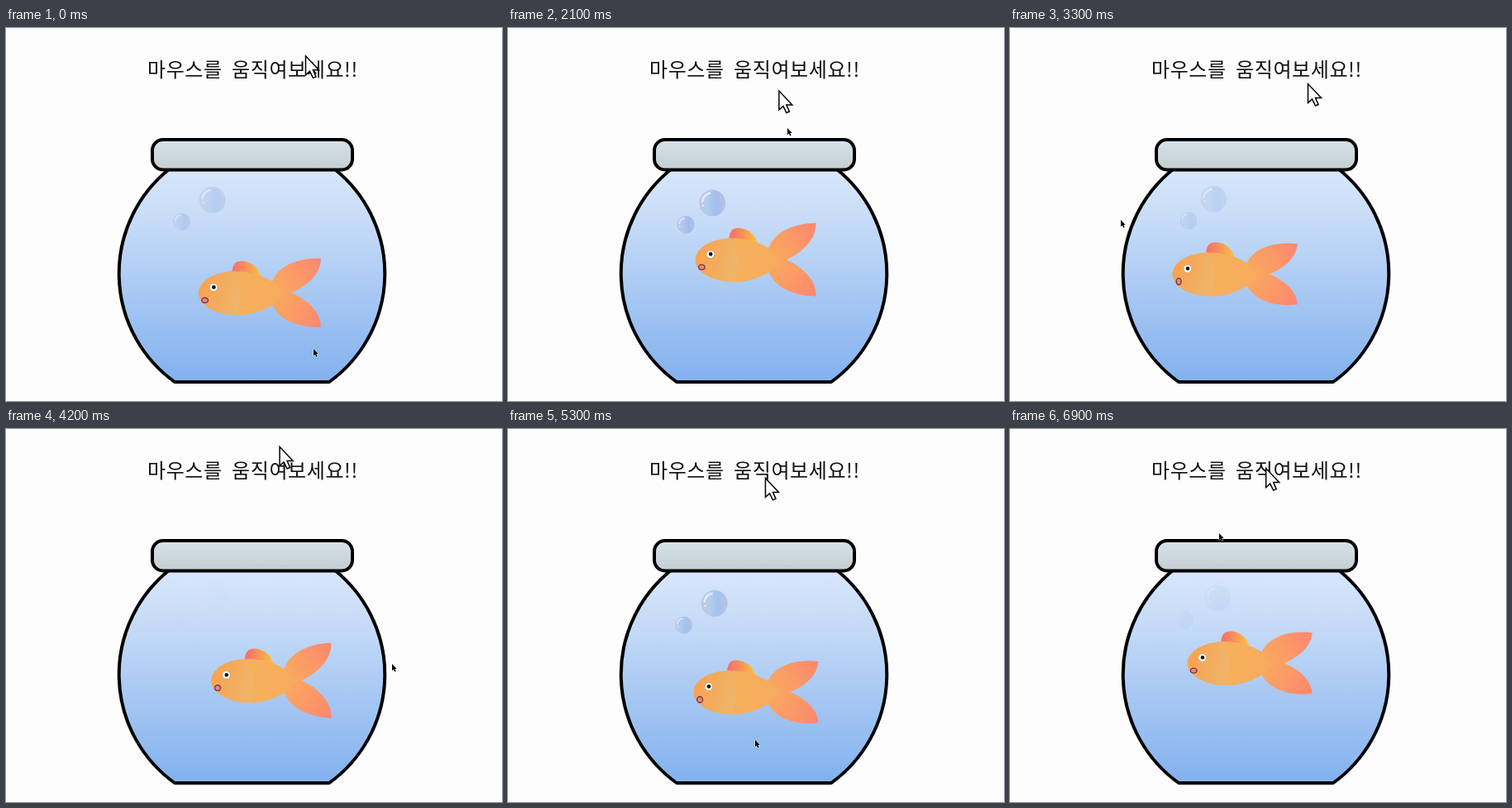
Recreate the animation shown at these times as an HTML page. Size 600 by 451 pixels, loop 7 s.

```html
<!DOCTYPE html>
<html lang="ko">
<head>
<meta charset="utf-8">
<title>Fishbowl</title>
<style>
  html, body { margin: 0; width: 100%; height: 100%; overflow: hidden; background: #fdfdfd; }
  svg { display: block; width: 100vw; height: 100vh; }
  text { font: 500 24px "Noto Sans CJK KR", "Noto Sans CJK", sans-serif; letter-spacing: .6px; word-spacing: 4px; fill: #111; }
</style>
</head>
<body>
<svg viewBox="0 0 600 451" preserveAspectRatio="none">
  <defs>
    <linearGradient id="water" x2="0" y2="1">
      <stop stop-color="#d8e6fb"/><stop offset=".25" stop-color="#c6dbf7"/><stop offset="1" stop-color="#82b1ee"/>
    </linearGradient>
    <linearGradient id="glass" x2="0" y2="1">
      <stop stop-color="#d6e2ea"/><stop offset="1" stop-color="#c4ced1"/>
    </linearGradient>
    <linearGradient id="skin">
      <stop stop-color="#f8a653"/><stop offset=".5" stop-color="#f6b05c"/><stop offset="1" stop-color="#f7ab5e"/>
    </linearGradient>
    <linearGradient id="face" x2="1" y2=".25">
      <stop stop-color="#fba04e"/><stop offset="1" stop-color="#efb468"/>
    </linearGradient>
    <linearGradient id="crest">
      <stop stop-color="#f46f70"/><stop offset=".4" stop-color="#f88c5c"/><stop offset="1" stop-color="#fcc43c"/>
    </linearGradient>
    <linearGradient id="tail">
      <stop stop-color="#f8ab5c"/><stop offset=".45" stop-color="#fb9c66"/><stop offset="1" stop-color="#fc8670"/>
    </linearGradient>
    <linearGradient id="shine">
      <stop stop-color="#c2bad4"/><stop offset=".3" stop-color="#a9c4e8"/>
      <stop offset=".65" stop-color="#8fb3e8"/><stop offset="1" stop-color="#b0b6da"/>
    </linearGradient>
    <g id="bubble">
      <circle r="16" fill="url(#shine)"/>
      <path d="M-12 -2Q-11 -10 -3 -12" fill="none" stroke="#eef5fd" stroke-width="2.4" stroke-linecap="round"/>
      <circle cx="-11" cy="3" r="1.4" fill="#e6effb"/>
    </g>
    <path id="fin" d="M-3 -3C8 -22 38 -25 70 0C58 16 34 19 0 8Z" fill="url(#tail)"/>
  </defs>

  <rect width="600" height="451" fill="#fdfdfd"/>
  <text x="171" y="58.5">마우스를 움직여보세요!!</text>

  <g stroke="#000" stroke-width="4" stroke-linejoin="round">
    <path d="M197 171A161.5 161.5 0 0 0 204 428H391A161.5 161.5 0 0 0 398 171Z" fill="url(#water)"/>
    <rect x="177" y="135" width="242" height="36.5" rx="13" fill="url(#glass)"/>
  </g>

  <g id="bubbles">
    <use id="big" href="#bubble"/>
    <use id="small" href="#bubble"/>
  </g>

  <g id="fish">
    <use id="finUp" href="#fin"/>
    <use id="finDown" href="#fin"/>
    <path d="M33 -33C33 -44 38 -48 45 -47.5C56 -47 66 -39 68 -27Z" fill="url(#crest)"/>
    <path d="M-7.5 -9C-7.5 -24 14 -35 36 -35C58 -35 74 -28 86 -20L95 -8L86 3C74 11 58 18 40 18C14 18 -7.5 6 -7.5 -9Z" fill="url(#skin)"/>
    <path d="M-7.5 -9C-7.5 -24 14 -35 36 -35Q50 -9 38 18C14 18 -7.5 6 -7.5 -9Z" fill="url(#face)"/>
    <circle cx="10.5" cy="-15.5" r="4.8" fill="#fff" stroke="#b98a5a" stroke-width=".5"/>
    <circle cx="10.8" cy="-15.8" r="2.3" fill="#111"/>
    <ellipse id="mouth" fill="#df8a80" stroke="#7a3340" stroke-width="1.4"/>
  </g>

  <path id="arrow" d="M0 0V23L5 18.5L9 26.5L12.5 25L9 17H16Z" fill="#fff" stroke="#000" stroke-width="1.5"/>
  <path id="pointer" d="M0 0V8.2L1.8 6.6L3.2 9.6L4.6 9L3.3 6H5.6Z" fill="#000" stroke="#fff" stroke-width=".8" paint-order="stroke"/>
</svg>
<script>
const $ = id => document.getElementById(id);
const LOOP = 7000, STEP = 100, TAU = 2 * Math.PI;

// pointer route: seconds, x, y
const route = [
  [0, 372, 388], [.3, 364, 393], [.6, 300, 365], [.8, 222, 392], [1, 140, 426],
  [1.15, 82, 396], [1.3, 115, 341], [1.6, 104, 240], [1.8, 200, 160], [2.1, 338, 121],
  [2.4, 420, 210], [2.7, 320, 320], [3, 180, 310], [3.2, 122, 258], [3.3, 134, 232],
  [3.6, 240, 150], [3.85, 390, 190], [4.05, 473, 250], [4.2, 467, 284], [4.5, 250, 330],
  [4.7, 40, 290], [4.8, 60, 260], [5.1, 495, 300], [5.3, 299, 376], [5.6, 150, 300],
  [5.9, 555, 120], [6.1, 440, 15], [6.4, 146, 190], [6.5, 156, 260], [6.65, 200, 328],
  [6.9, 253, 126], [7, 262, 100]
];

function slope(i, k) {
  const a = route[Math.max(i - 1, 0)], b = route[i], c = route[Math.min(i + 1, route.length - 1)];
  if ((b[k] - a[k]) * (c[k] - b[k]) <= 0) return 0;
  return (c[k] - a[k]) / (c[0] - a[0]);
}

function pointerAt(t) {
  t = Math.max(t, 0);
  let i = 0;
  while (i < route.length - 2 && route[i + 1][0] <= t) i++;
  const a = route[i], b = route[i + 1], h = b[0] - a[0], u = (t - a[0]) / h, v = 1 - u;
  return [1, 2].map(k =>
    v * v * (1 + 2 * u) * a[k] + u * u * (3 - 2 * u) * b[k] +
    h * u * v * (v * slope(i, k) - u * slope(i + 1, k)));
}

const wave = (t, period, peak = 0) => Math.cos(TAU * (t - peak) / period);
const place = (id, x, y, extra = "") =>
  $(id).setAttribute("transform", `translate(${x.toFixed(2)} ${y.toFixed(2)})${extra}`);

function draw(t) {
  const [px, py] = pointerAt(t);
  place("pointer", px, py);

  const a = (240 * t - 32.6) * TAU / 360;
  place("arrow", 338.3 + 28.7 * Math.cos(a), 49.3 + 28.7 * Math.sin(a));

  // the fish follows the pointer at a fraction of its travel
  const [fx, fy] = pointerAt(t - .02);
  place("fish", 184.8 + .15 * fx, 271 + .15 * fy);
  const spread = 36 + 4.5 * wave(t, 1.88, 4.2);
  place("finUp", 84, -9, ` rotate(${-spread})`);
  place("finDown", 84, -9, ` rotate(${spread}) scale(1 -1)`);
  const gape = .5 * wave(t, 7 / 3);
  $("mouth").setAttribute("rx", 3.4 + gape);
  $("mouth").setAttribute("ry", 3.5 - gape);

  const rise = (t + 1.75) % 3 / 3;
  const sway = -3.2 * Math.sin(TAU * t / 1.5 - .1);
  $("bubbles").setAttribute("opacity", 1 - rise);
  place("big", 249.3 + sway, 215 - 12 * rise);
  place("small", 213 - sway, 241.3 - 12 * rise, " scale(.66)");
}

const start = performance.now();
function tick() {
  const ms = (performance.now() - start) % LOOP;
  draw(Math.floor(ms / STEP) * STEP / 1000);
  requestAnimationFrame(tick);
}
tick();
</script>
</body>
</html>
```
